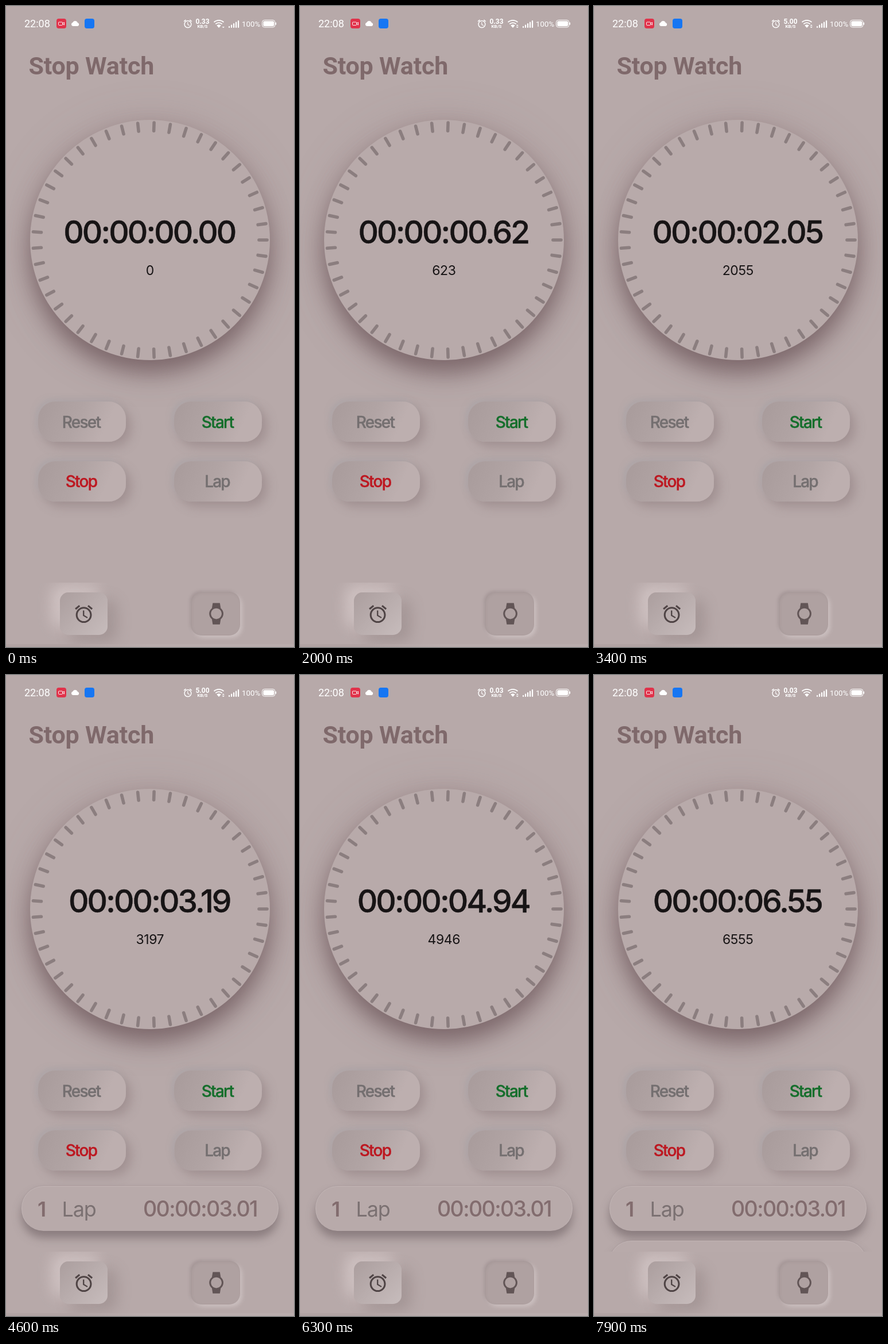
These frames come from a looping animation (502 px wide and 1115 px high, 8 s). An HTML page:

```html
<!DOCTYPE html>
<html lang="en">
<head>
<meta charset="utf-8">
<title>Stop Watch</title>
<style>
html, body { margin: 0; width: 100%; height: 100%; overflow: hidden; background: #b7a9a9; }
#stage { position: absolute; left: 0; top: 0; width: 502px; height: 1115px; overflow: hidden; background: #b7a9a9; }
#stage div { position: absolute; box-sizing: border-box; }
svg { position: absolute; left: 0; top: 0; font-family: Inter, sans-serif; font-optical-sizing: none; }
.dial {
  left: 42px; top: 198px; width: 418px; height: 418px; border-radius: 50%; background: #b8aaaa;
  box-shadow: 0 22px 38px rgba(98, 76, 80, .66), 0 6px 76px rgba(130, 100, 105, .26);
}
.btn {
  width: 153px; height: 70px; border-radius: 30px;
  background: linear-gradient(115deg, #a99c9c 5%, #b1a4a4 45%, #bdafaf 75%);
  box-shadow: 9px 9px 18px rgba(120, 100, 103, .34), -5px -5px 9px rgba(170, 165, 170, .5);
}
.list { left: 0; top: 870px; width: 502px; height: 133px; overflow: hidden; }
.card {
  left: 27px; width: 448px; height: 78px; border-radius: 38px; background: #b8aaaa;
  border: 1px solid rgba(200, 189, 189, .6); border-bottom-color: transparent;
  box-shadow: 0 12px 15px rgba(95, 82, 85, .5), 0 -1px 2px rgba(125, 110, 112, .12);
}
.nav { left: 0; top: 1003px; width: 502px; height: 112px; overflow: hidden; }
.alarm {
  left: 94px; top: 17px; width: 83px; height: 74px; border-radius: 15px;
  background: linear-gradient(135deg, #ab9e9e, #c7bcbc);
  box-shadow: 16px 12px 24px rgba(125, 108, 110, .33), -14px -12px 26px rgba(222, 211, 211, .65);
}
.watch {
  left: 322px; top: 16px; width: 86px; height: 76px; border-radius: 19px; background: #afa1a1;
  box-shadow: inset 2px 2px 4px rgba(125, 109, 111, .16), 4px 4px 7px rgba(214, 203, 203, .65), -2px -2px 4px rgba(135, 120, 122, .3);
}
.label { font-size: 28px; font-weight: 500; letter-spacing: -1.8px; text-anchor: middle; stroke-width: .4; }
.clock { font-size: 55px; font-weight: 500; letter-spacing: -2.9px; text-anchor: middle; fill: #171415; stroke: #171415; stroke-width: .4; }
.lap { font-size: 36px; fill: #826c6e; }
.status { font-family: Roboto, sans-serif; fill: #fff; }
</style>
</head>
<body>
<div id="stage">
  <div class="dial"></div>
  <div class="btn" style="left:56px;top:688px"></div>
  <div class="btn" id="start" style="left:293px;top:688px"></div>
  <div class="btn" style="left:56px;top:792px"></div>
  <div class="btn" id="lap" style="left:293px;top:792px"></div>
  <div class="list">
    <div class="card" id="card1" style="top:19px"></div>
    <div class="card" id="card2" style="top:114px"></div>
  </div>
  <div class="nav">
    <div class="alarm"></div>
    <div class="watch"></div>
    <div style="left:0;top:107px;width:502px;height:5px;background:linear-gradient(90deg,#b1a3a3 25%,#bbaeae 50%)"></div>
  </div>
  <svg width="502" height="1115" viewBox="0 0 502 1115">
    <defs>
      <path id="alarmIcon" d="M22 5.72l-4.6-3.86-1.29 1.53 4.6 3.86L22 5.72zM7.88 3.39L6.6 1.86 2 5.71l1.29 1.53 4.59-3.85zM12.5 8H11v6l4.75 2.85.75-1.23-4-2.37V8zM12 4c-4.97 0-9 4.03-9 9s4.02 9 9 9c4.97 0 9-4.03 9-9s-4.03-9-9-9zm0 16c-3.87 0-7-3.13-7-7s3.13-7 7-7 7 3.13 7 7-3.13 7-7 7z"/>
    </defs>

    <!-- status bar -->
    <g class="status">
      <text x="32" y="37" font-size="18">22:08</text>
      <rect x="88" y="22" width="17" height="17" rx="4" fill="#e0324a"/>
      <g fill="none" stroke="#fff" stroke-width=".9">
        <rect x="91.5" y="28" width="7" height="5.5" rx="1"/>
        <path d="M98.5 30.2l3-1.7v4.5l-3-1.7"/>
      </g>
      <path d="M116.5 35a3.4 3.4 0 0 1 0-6.6a4.6 4.6 0 0 1 8.3.6a3.1 3.1 0 0 1 .2 6z"/>
      <rect x="137" y="22" width="17" height="17" rx="4" fill="#1676f3"/>
      <use href="#alarmIcon" transform="translate(308.2 22.2) scale(.73)"/>
      <text id="speed" x="342.5" y="31.3" font-size="12" font-weight="700" text-anchor="middle"></text>
      <text x="342.5" y="38.3" font-size="8" font-weight="700" text-anchor="middle">KB/S</text>
      <g fill="none" stroke="#fff" stroke-width="1.7">
        <path d="M362.5 28.2a12.5 12.5 0 0 1 17 0"/>
        <path d="M365.3 31.4a8.2 8.2 0 0 1 11.4 0"/>
      </g>
      <path d="M367.3 33.8a5.3 5.3 0 0 1 7.4 0l-3.7 4.2z"/>
      <path id="up" d="M376.7 34.6h4.2l-2.1-2.3z"/>
      <path id="down" d="M376.7 36h4.2l-2.1 2.3z"/>
      <g id="bars"></g>
      <text x="411" y="35.5" font-size="13.3">100%</text>
      <rect x="446.5" y="24.5" width="22.5" height="12.5" rx="4" fill="none" stroke="#fff"/>
      <rect x="448.3" y="26.3" width="19" height="9" rx="2.5"/>
      <rect x="469.5" y="28.5" width="1.6" height="4.5" rx=".8"/>
    </g>

    <text x="39.5" y="118.5" font-family="Roboto, sans-serif" font-size="43" font-weight="700" letter-spacing="-.2" fill="#7f696b">Stop Watch</text>

    <g id="ticks" stroke="#8b7e7f" stroke-width="5.6" stroke-linecap="round"></g>
    <text id="time" class="clock" x="249.8" y="413"></text>
    <text id="millis" x="250.8" y="468" font-size="23" letter-spacing="-.4" text-anchor="middle" fill="#171415"></text>

    <g class="label">
      <text x="131" y="733.5" fill="#746f70" stroke="#746f70">Reset</text>
      <text x="368.5" y="733.5" fill="#146e2b" stroke="#146e2b">Start</text>
      <text x="131" y="836.5" fill="#bd1720" stroke="#bd1720">Stop</text>
      <text x="368" y="836.5" fill="#746f70" stroke="#746f70">Lap</text>
    </g>

    <g id="row" class="lap">
      <text x="55" y="941.5" font-weight="600">1</text>
      <text x="97.5" y="941.5" fill="#7b7172" letter-spacing="-1.2">Lap</text>
      <text x="438" y="942" font-size="37.5" font-weight="500" letter-spacing="-1.6" text-anchor="end">00:00:03.01</text>
    </g>

    <use href="#alarmIcon" transform="translate(117 1039) scale(1.55)" fill="#4f4445"/>
    <path transform="translate(348 1038.5) scale(1.55)" fill="#625556" d="M20 12c0-2.54-1.19-4.81-3.04-6.27L16 0H8l-.95 5.73C5.19 7.19 4 9.45 4 12s1.19 4.81 3.05 6.27L8 24h8l.96-5.73C18.81 16.81 20 14.54 20 12zM6 12c0-3.31 2.69-6 6-6s6 2.69 6 6-2.69 6-6 6-6-2.69-6-6z"/>
  </svg>
</div>
<script>
const LOOP = 8000, STEP = 100;
const $ = id => document.getElementById(id);
const show = (id, on) => { $(id).style.visibility = on ? 'visible' : 'hidden'; };
const pad = n => String(n).padStart(2, '0');

let ticks = '';
for (let a = 0; a < 360; a += 8)
  ticks += `<path d="M441 407h14" transform="rotate(${a} 251 407)"/>`;
$('ticks').innerHTML = ticks;

let bars = '';
for (let i = 0; i < 5; i++) {
  const h = 3 + i * 2.5;
  bars += `<rect x="${388 + i * 4}" y="${38 - h}" width="2.2" height="${h}" rx="1"/>`;
}
$('bars').innerHTML = bars;

// [loop time, elapsed time]; the timer lags a little unevenly
const marks = [[1300, 0], [1400, 37], [1600, 237], [1700, 237], [1800, 423], [2000, 623], [3400, 2055],
  [4400, 3013], [4600, 3197], [5600, 4237], [7000, 5655], [7900, 6555]];

function elapsed(t) {
  const i = marks.findIndex(m => t <= m[0]);
  if (i === 0) return 0;
  const [t0, v0] = marks[i - 1], [t1, v1] = marks[i];
  return Math.round(v0 + (v1 - v0) * (t - t0) / (t1 - t0));
}

function format(ms) {
  const s = Math.floor(ms / 1000);
  return `00:${pad(Math.floor(s / 60))}:${pad(s % 60)}.${pad(Math.floor(ms % 1000 / 10))}`;
}

function press(id, on) {
  $(id).style.transform = on ? 'scale(.992)' : '';
}

function draw(now) {
  const t = Math.floor(now % LOOP / STEP) * STEP;
  const ms = elapsed(t);
  $('time').textContent = format(ms);
  $('millis').textContent = ms;
  $('speed').textContent = t < 2300 ? '0.33' : t < 5900 ? '5.00' : '0.03';
  show('up', t >= 900 && t < 6400);
  show('down', t < 6400);
  show('card1', t >= 4400);
  show('row', t >= 4400);
  show('card2', t >= 6700);
  press('start', t >= 1400 && t < 1600);
  press('lap', (t >= 4400 && t < 4700) || (t >= 6700 && t < 7000));
}

function frame() {
  draw(performance.now());
  requestAnimationFrame(frame);
}
frame();
</script>
</body>
</html>
```
